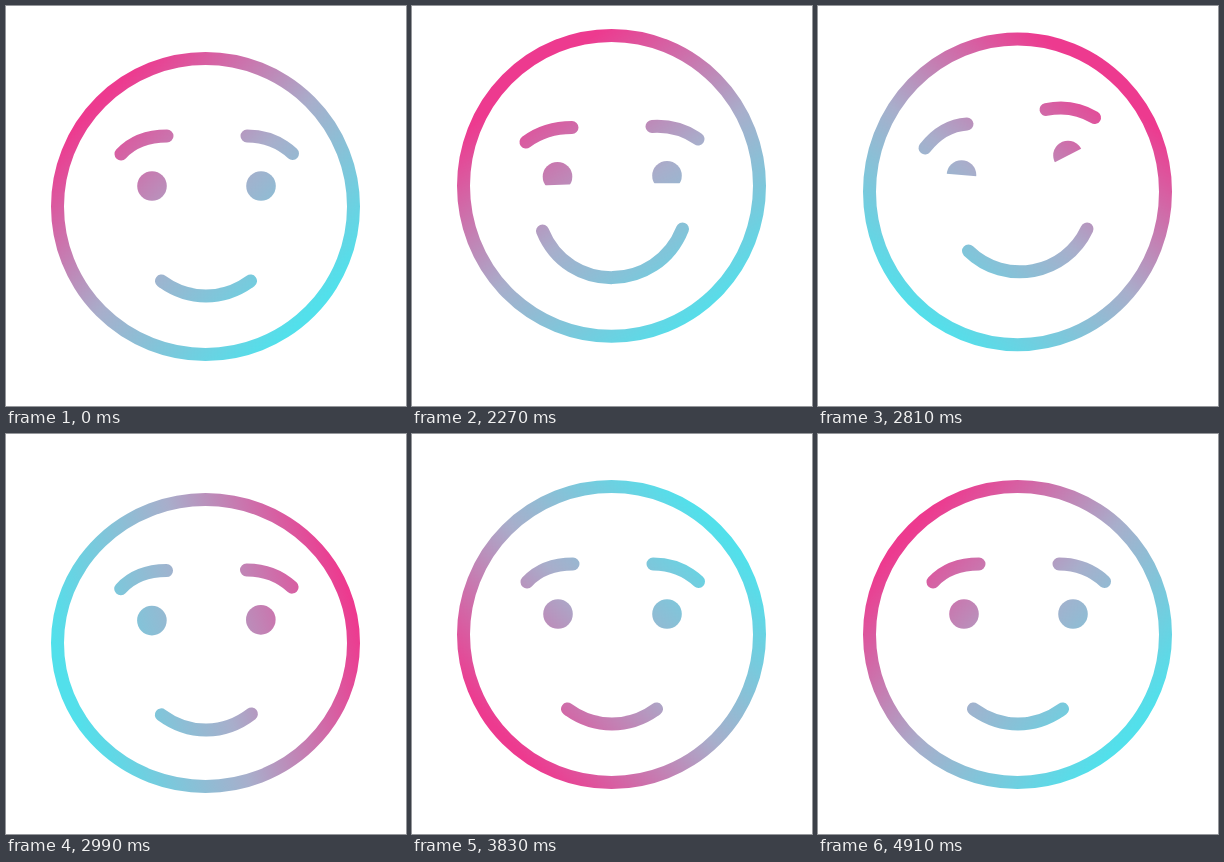
An HTML page for the animation above (5.18 s loop, 400 by 400 pixels).

```html
<!DOCTYPE html>
<html lang="en">
<head>
<meta charset="utf-8">
<title>Smiling face</title>
<style>
html, body { margin: 0; width: 100%; height: 100%; overflow: hidden; background: #fff; }
svg { display: block; width: 100vw; height: 100vh; }

.line { fill: none; stroke: #fff; stroke-width: 13; stroke-linecap: round; }
.eye circle { fill: #fff; r: 14.8px; }
.lid { fill: #000; }

.paint, .ring, .face, .brow, .eye, .lid, .mouth {
  animation: 5180ms ease-in-out infinite;
}

/* Colour sweep */
.paint { transform-origin: 200px 200px; transform: rotate(45deg); animation-name: sweep; }
@keyframes sweep {
  0%, 39.1% { transform: rotate(45deg); animation-timing-function: cubic-bezier(.29, 0, .45, 1); }
  100% { transform: rotate(405deg); }
}

/* Outline: crouch, leap, float, land */
.ring { cx: 199.5px; cy: 200.5px; rx: 148px; ry: 148px; animation-name: leap; }
@keyframes leap {
  0%, 38.61% { cy: 200.5px; ry: 148px; }
  40.93% { cy: 214.5px; ry: 141px; animation-timing-function: cubic-bezier(.45, 0, .7, .75); }
  43.82% { cy: 180px; ry: 150.5px; animation-timing-function: ease-out; }
  45.56% { cy: 173.5px; ry: 148px; }
  52.51% { cy: 173.5px; ry: 148px; animation-timing-function: ease-in; }
  54.25% { cy: 185.5px; ry: 153px; animation-timing-function: ease-out; }
  56.56% { cy: 214.5px; ry: 141px; }
  59.46% { cy: 198.5px; ry: 148px; }
  62.36%, 100% { cy: 200.5px; ry: 148px; }
}

.face { animation-name: bob; }
@keyframes bob {
  0%, 39.19% { transform: translateY(0); }
  41.51% { transform: translateY(9px); }
  43.82%, 54.25% { transform: translateY(0); }
  57.72% { transform: translateY(7px); }
  60.62% { transform: translateY(-1px); }
  62.93%, 100% { transform: translateY(0); }
}

/* Brows */
.brow.l { d: path("M115 148C127 135 143 130 161 130"); animation-name: browL; }
@keyframes browL {
  0%, 41.2% { d: path("M115 148C127 135 143 130 161 130"); }
  43.82% { d: path("M114 136C126 127 143 121.5 160 121.5"); }
  46.72% { d: path("M113 125C125 116 142 110 159 110"); }
  50.19% { d: path("M107 139C118 125 133 116 149 115"); }
  54.25% { d: path("M107 142C118 128 133 119 149 118"); }
  58.3%, 100% { d: path("M115 148C127 135 143 130 161 130"); }
}
.brow.r { d: path("M241 130C257 130 273 135 286.5 147.5"); animation-name: browR; }
@keyframes browR {
  0%, 41.2% { d: path("M241 130C257 130 273 135 286.5 147.5"); }
  43.82% { d: path("M240 120.5C256 119.5 273 124 286 133"); }
  46.72% { d: path("M239 109C255 108 272 113 285 122"); }
  50.19% { d: path("M228 100.5C245 97 261 99 276.5 108.5"); }
  54.25% { d: path("M228 103.5C245 100 261 102 276.5 111.5"); }
  58.3%, 100% { d: path("M241 130C257 130 273 135 286.5 147.5"); }
}

/* Eyes and the lids that cut them from below */
.eye.l { transform: translate(146px, 180px); animation-name: eyeL; }
@keyframes eyeL {
  0%, 41.2% { transform: translate(146px, 180px); }
  43.82% { transform: translate(145.5px, 170.8px); }
  46.72% { transform: translate(145px, 160px); }
  50.19% { transform: translate(143.5px, 166px); }
  54.25% { transform: translate(143.5px, 169px); }
  58.3%, 100% { transform: translate(146px, 180px); }
}
.eye.r { transform: translate(255px, 180px); animation-name: eyeR; }
@keyframes eyeR {
  0%, 41.2% { transform: translate(255px, 180px); }
  43.82% { transform: translate(255px, 169.8px); }
  46.72% { transform: translate(254px, 158px); }
  50.19% { transform: translate(250px, 146.5px); }
  54.25% { transform: translate(250px, 149.5px); }
  58.3%, 100% { transform: translate(255px, 180px); }
}
.lid { transform: rotate(0deg) translateY(17px); }
.l .lid { animation-name: lidL; }
@keyframes lidL {
  0%, 41.2% { transform: rotate(0deg) translateY(17px); }
  43.82% { transform: rotate(-2deg) translateY(8px); }
  46.72% { transform: rotate(0deg) translateY(1px); }
  50.19%, 54.25% { transform: rotate(5deg) translateY(0); }
  58.3%, 100% { transform: rotate(0deg) translateY(17px); }
}
.r .lid { animation-name: lidR; }
@keyframes lidR {
  0%, 41.2% { transform: rotate(0deg) translateY(17px); }
  43.82% { transform: rotate(0deg) translateY(7.5px); }
  46.72% { transform: rotate(-8deg) translateY(1px); }
  50.19%, 54.25% { transform: rotate(-27deg) translateY(0); }
  58.3%, 100% { transform: rotate(0deg) translateY(17px); }
}

/* Mouth */
.mouth { d: path("M155.5 275C183 295 217 295 244.5 275"); animation-name: smile; }
@keyframes smile {
  0%, 39.8% { d: path("M155.5 275C183 295 217 295 244.5 275"); }
  43.82% { d: path("M130.5 225C156 288 245 287 270.5 223"); }
  46.72% { d: path("M131 217C156 280 246 279 271 214"); }
  50.19% { d: path("M149 241C186 277 248 266 270 219"); }
  54.25% { d: path("M150.5 245C187 280.5 247.6 269 269 223"); }
  58.3%, 100% { d: path("M155.5 275C183 295 217 295 244.5 275"); }
}
</style>
</head>
<body>
<svg viewBox="0 0 400 400">
  <defs>
    <linearGradient id="tint" gradientUnits="userSpaceOnUse" x1="52" y1="200" x2="348" y2="200">
      <stop offset="0" stop-color="#ed3a8f"/>
      <stop offset=".5" stop-color="#a8aecb"/>
      <stop offset="1" stop-color="#52e0eb"/>
    </linearGradient>
    <mask id="shape" maskUnits="userSpaceOnUse" x="0" y="0" width="400" height="400">
      <ellipse class="line ring" cx="199.5" cy="200.5" rx="148" ry="148"/>
      <g class="face">
        <g class="eye l">
          <circle r="14.8"/>
          <rect class="lid" x="-24" y="0" width="48" height="22"/>
        </g>
        <g class="eye r">
          <circle r="14.8"/>
          <rect class="lid" x="-24" y="0" width="48" height="22"/>
        </g>
        <path class="line brow l"/>
        <path class="line brow r"/>
        <path class="line mouth"/>
      </g>
    </mask>
  </defs>
  <g mask="url(#shape)">
    <rect class="paint" x="-100" y="-100" width="600" height="600" fill="url(#tint)"/>
  </g>
</svg>
</body>
</html>
```
